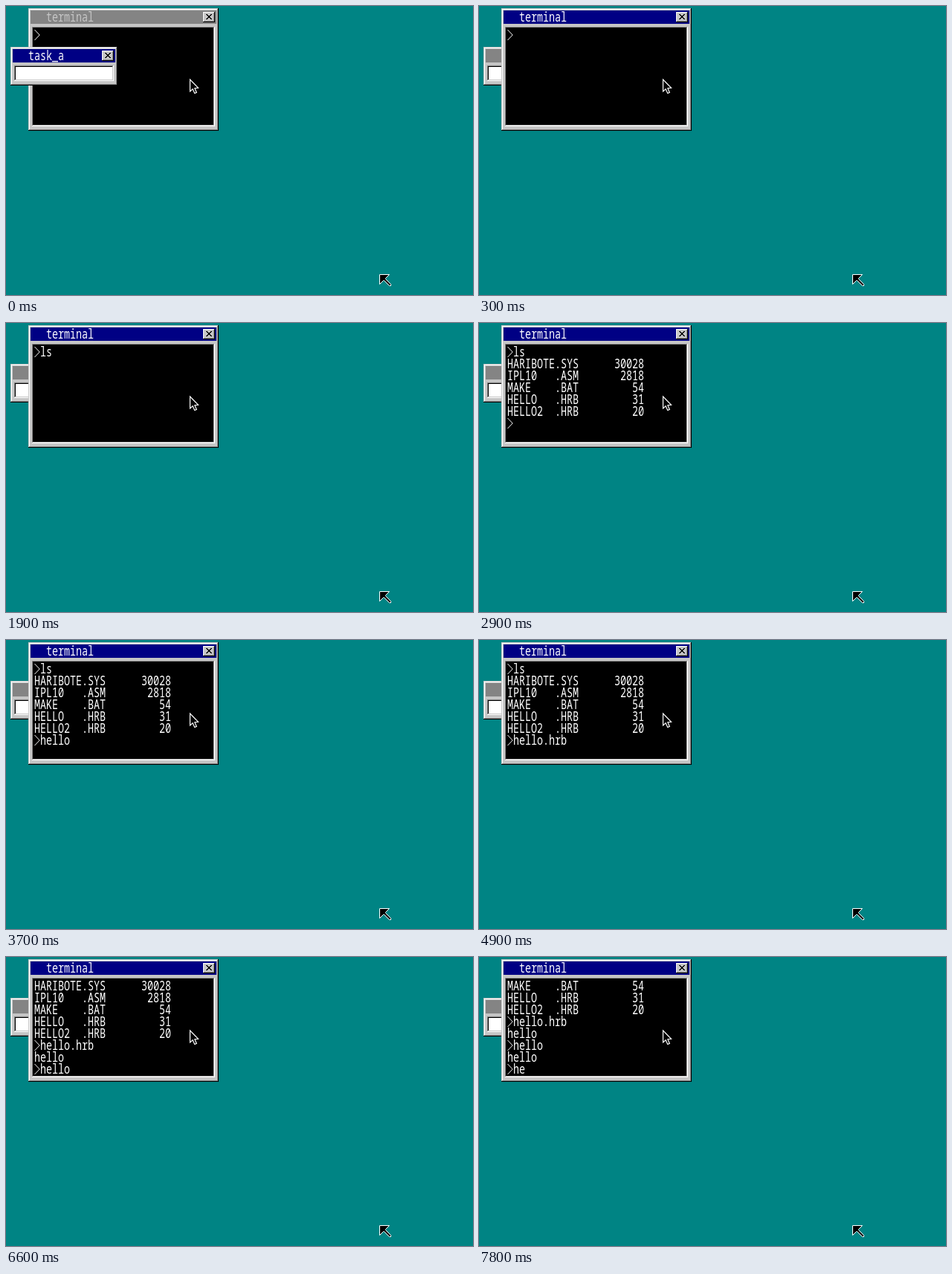
Recreate the animation shown at these times as an HTML page with a canvas. Size 628 by 389 pixels, loop 8 s.

```html
<!DOCTYPE html>
<html lang="en">
<head>
<meta charset="utf-8">
<title>Desktop with terminal</title>
<style>
  html, body { margin: 0; width: 100%; height: 100%; overflow: hidden; background: #008484; }
  canvas { display: block; }
</style>
</head>
<body>
<canvas id="stage" width="628" height="389"></canvas>
<script>
const ctx = document.getElementById('stage').getContext('2d');
const LOOP = 8000, FOCUS_TIME = 300, ROWS = 8;
const TEAL = '#008484', GREY = '#848484', SILVER = '#c6c6c6', NAVY = '#000084';
const WHITE = '#ffffff', BLACK = '#000000';

const file = (name, ext, size) => `${name.padEnd(8)}.${ext}${String(size).padStart(11)}`;
const OUTPUT = {
  'ls': [
    file('HARIBOTE', 'SYS', 30028),
    file('IPL10', 'ASM', 2818),
    file('MAKE', 'BAT', 54),
    file('HELLO', 'HRB', 31),
    file('HELLO2', 'HRB', 20),
  ],
  'hello.hrb': ['hello'],
  'hello': ['hello'],
};

// Typed characters and the moment each one arrives.
const KEYS = 'ls\nhello.hrb\nhello\nhe';
const KEY_TIMES = [
  1800, 1900, 2000,
  3000, 3200, 3400, 3500, 3700, 4100, 4600, 4700, 4900, 5000,
  5800, 6200, 6400, 6500, 6600, 7100,
  7600, 7800,
];

// Fills a rectangle given by its inclusive corner pixels.
function box(color, x0, y0, x1, y1) {
  ctx.fillStyle = color;
  ctx.fillRect(x0, y0, x1 - x0 + 1, y1 - y0 + 1);
}

function polygon(x, y, points, fill, stroke, width) {
  ctx.beginPath();
  points.forEach(([px, py]) => ctx.lineTo(x + px + 0.5, y + py + 0.5));
  ctx.closePath();
  ctx.fillStyle = fill;
  ctx.fill();
  ctx.strokeStyle = stroke;
  ctx.lineWidth = width;
  ctx.stroke();
}

// Tall console lettering on an 8 x 16 cell.
function text(str, x, y, color) {
  ctx.save();
  ctx.translate(x, y + 14);
  ctx.scale(1, 1.3);
  ctx.font = '300 13.333px "Noto Sans Mono", "DejaVu Sans Mono", monospace';
  ctx.fillStyle = color;
  ctx.fillText(str, 0, 0);
  ctx.restore();
}

function prompt(x, y) {
  ctx.beginPath();
  ctx.moveTo(x + 0.5, y + 1);
  ctx.lineTo(x + 7.2, y + 8);
  ctx.lineTo(x + 0.5, y + 15);
  ctx.strokeStyle = WHITE;
  ctx.lineWidth = 1;
  ctx.stroke();
}

function closeButton(x, y) {
  box(BLACK, x, y, x + 15, y + 13);
  box(WHITE, x, y, x + 14, y + 12);
  box(GREY, x + 1, y + 1, x + 14, y + 12);
  box(SILVER, x + 1, y + 1, x + 13, y + 11);
  for (let i = 0; i < 7; i++) {
    const d = Math.min(i, 6 - i), row = y + 3 + i;
    box(BLACK, x + 4 + d, row, x + 5 + d, row);
    box(BLACK, x + 10 - d, row, x + 11 - d, row);
  }
}

function drawWindow(x, y, w, h, title, active, fieldColor) {
  const r = x + w - 1, b = y + h - 1;
  box(BLACK, x, y, r, b);
  box(SILVER, x, y, r - 1, b - 1);
  box(GREY, x + 1, y + 1, r - 1, b - 1);
  box(WHITE, x + 1, y + 1, r - 2, b - 2);
  box(SILVER, x + 2, y + 2, r - 2, b - 2);
  box(active ? NAVY : GREY, x + 3, y + 3, r - 3, y + 20);
  text(title, x + 24, y + 4, active ? WHITE : SILVER);
  closeButton(r - 20, y + 5);

  // Sunken field
  const fx = x + 8, fy = y + 28, fr = r - 7, fb = b - 8;
  box(WHITE, fx - 3, fy - 3, fr + 2, fb + 2);
  box(GREY, fx - 3, fy - 3, fr + 1, fb + 1);
  box(SILVER, fx - 2, fy - 2, fr + 1, fb + 1);
  box(BLACK, fx - 2, fy - 2, fr, fb);
  box(fieldColor, fx - 1, fy - 1, fr, fb);
}

function consoleAt(t) {
  const lines = ['>'];
  let lastKey = 0;
  KEY_TIMES.forEach((time, i) => {
    if (time > t) return;
    lastKey = time;
    const last = lines.length - 1;
    if (KEYS[i] === '\n') lines.push(...OUTPUT[lines[last].slice(1)], '>');
    else lines[last] += KEYS[i];
  });
  // A key press hides the cursor until its next blink.
  const blinkStart = 400 + Math.floor((t - 400) / 1000) * 1000;
  const cursor = t >= 400 && t - blinkStart < 500 && lastKey <= blinkStart;
  return { lines: lines.slice(-ROWS), cursor };
}

function drawTerminal(t) {
  drawWindow(30, 3, 256, 165, 'terminal', t >= FOCUS_TIME, BLACK);
  const { lines, cursor } = consoleAt(t);
  lines.forEach((line, row) => {
    const y = 31 + row * 16;
    if (line[0] === '>') {
      prompt(38, y);
      text(line.slice(1), 46, y, WHITE);
    } else {
      text(line, 38, y, WHITE);
    }
  });
  if (cursor) {
    const x = 38 + lines.at(-1).length * 8, y = 31 + (lines.length - 1) * 16;
    box(WHITE, x, y, x + 7, y + 15);
  }
}

function drawTask(t) {
  drawWindow(6, 55, 144, 52, 'task_a', t < FOCUS_TIME, WHITE);
}

function drawPointers() {
  polygon(502, 361, [[0, 0], [13, 0], [8, 5], [8, 6], [15, 13], [15, 15], [13, 15],
    [6, 8], [5, 8], [0, 13]], BLACK, WHITE, 1);
  polygon(247, 98, [[0, 0.5], [0, 16.5], [3.6, 13.2], [6.2, 19], [8.8, 17.9],
    [6.3, 12.2], [11, 11.8]], BLACK, WHITE, 1.2);
}

function frame() {
  const t = performance.now() % LOOP;
  box(TEAL, 0, 0, 627, 388);
  const layers = [drawTerminal, drawTask];
  if (t >= FOCUS_TIME) layers.reverse();
  layers.forEach(draw => draw(t));
  drawPointers();
  requestAnimationFrame(frame);
}
frame();
</script>
</body>
</html>
```
